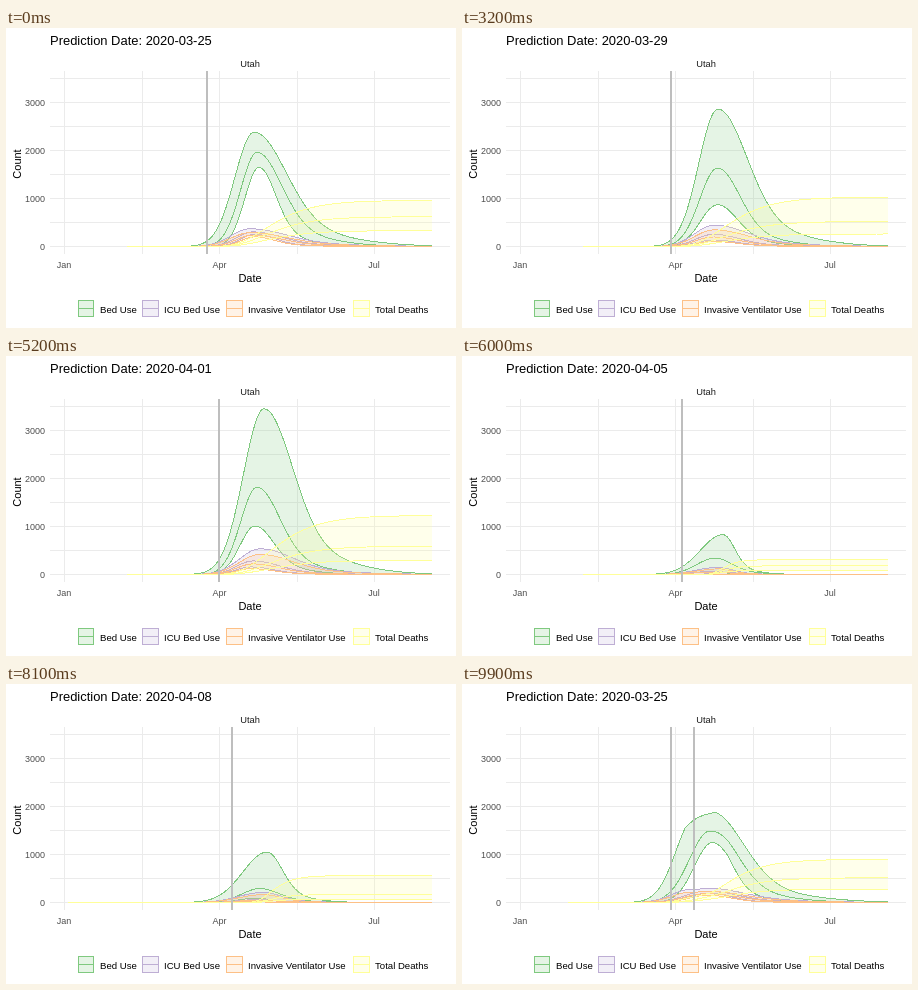
These frames come from a looping animation (450 by 300 pixels, 10000 ms). An HTML page:

```html
<!DOCTYPE html>
<html lang="en">
<head>
<meta charset="utf-8">
<title>Prediction by date</title>
<style>
  html, body { margin: 0; width: 100%; height: 100%; overflow: hidden; background: #fff; }
  svg { display: block; font-family: "Liberation Sans", Arial, sans-serif; }
  path, rect { shape-rendering: crispEdges; }
  .tick { font-size: 9px; fill: #4d4d4d; }
  .axis { font-size: 11px; }
  .mid { text-anchor: middle; }
  .end { text-anchor: end; }
</style>
</head>
<body>
<svg id="stage" width="450" height="300" viewBox="0 0 450 300"></svg>
<script>
const stage = document.getElementById('stage');
const START_X = 121, END_X = 426, ZERO_Y = 218.5, SAMPLES = 500;
const FRAME_MS = 100, FRAMES = 100, TWEEN_FRAMES = 4;

const dayX = day => 58 + day * 155 / 91;
const valueY = v => ZERO_Y - v * 0.048;
const mix = (a, b, f) => a + (b - a) * f;
const clamp = v => Math.max(0, Math.min(1, v));

function add(tag, attrs, text) {
  const el = document.createElementNS('http://www.w3.org/2000/svg', tag);
  for (const name in attrs) el.setAttribute(name, attrs[name]);
  if (text !== undefined) el.textContent = text;
  return stage.appendChild(el);
}

// Bed curves are [peak x, height, left spread, right spread] for upper, mean, lower.
const early = {
  start: 121, icu: 0.155, rise: [258, 27], deaths: [960, 620, 330],
  beds: [[248, 2380, 27, 44], [251, 1960, 23, 34], [253, 1650, 20, 23]]
};
const wider = {
  start: 121, icu: 0.155, rise: [260, 27], deaths: [962, 500, 250],
  beds: [[255, 2670, 26, 40], [257, 1590, 25, 30], [258, 850, 24, 27]]
};
const highest = {
  start: 121, icu: 0.155, rise: [262, 28], deaths: [1230, 590, 295],
  beds: [[258, 3450, 29, 39], [251, 1820, 23, 31], [249, 1010, 21, 26]]
};
const lowest = {
  start: 121, icu: 0.18, rise: [259, 10], deaths: [310, 180, 90],
  beds: [[261, 830, 32, 16], [253, 340, 26, 23], [250, 60, 24, 17]]
};
const later = {
  start: 62, icu: 0.2, rise: [264, 13], deaths: [560, 165, 70],
  beds: [[261, 1050, 34, 21], [254, 290, 26, 26], [250, 90, 24, 19]]
};
const latest = {
  start: 62, icu: 0.2, rise: [264, 18], deaths: [720, 200, 130],
  beds: [[262, 480, 34, 43], [258, 130, 28, 35], [255, 50, 26, 26]]
};

// [date, day of year from 0, first frame of the change to the next state, forecast]
const states = [
  ['03-25', 84, 5, early], ['03-26', 85, 14, early], ['03-27', 86, 23, early],
  ['03-29', 88, 32, wider], ['03-30', 89, 41, highest], ['03-31', 90, 49, highest],
  ['04-01', 91, 57, highest], ['04-05', 95, 65, lowest], ['04-07', 97, 73, lowest],
  ['04-08', 98, 81, later], ['04-09', 99, 89, later], ['04-12', 102, 97, latest]
].map(([date, day, leave, forecast]) => ({ date, x: dayX(day), leave, forecast }));

const bell = d => Math.exp(-d * d);

// Steep rise, and a fall with a long tail.
function hump(x, [peak, height, left, right]) {
  const d = x - peak;
  return height * (d < 0 ? bell(d / left) : 0.8 * bell(d / right) + 0.2 * bell(d / right / 2.2));
}

const care = scale => (m, band, x) => {
  const [peak, height, left, right] = m.beds[band];
  return hump(x, [peak - 4, height * m.icu * scale, left, right * 1.15]);
};

const series = [
  { name: 'Bed Use', color: '#7fc97f', keyX: 72, keyW: 15, value: (m, band, x) => hump(x, m.beds[band]) },
  { name: 'ICU Bed Use', color: '#beaed4', keyX: 136, keyW: 16, value: care(1) },
  { name: 'Invasive Ventilator Use', color: '#fdc086', keyX: 220, keyW: 16, value: care(0.78) },
  { name: 'Total Deaths', color: '#ffff99', keyX: 347, keyW: 16,
    value: (m, band, x) => m.deaths[band] * Math.exp(-Math.exp((m.rise[0] - x) / m.rise[1])) }
];

// Curves with an earlier start pair up with the others by a lag that fades out across these spans.
const lagSpans = [[238, 254], [205, 265], [205, 265]];

function pairedX(x, band, m) {
  const [lo, hi] = lagSpans[band];
  return x - (START_X - m.start) * clamp((hi - x) / (hi - lo));
}

function curve(value, band, a, b, f) {
  const points = [];
  for (let i = 0; i <= SAMPLES; i++) {
    const x = mix(START_X, END_X, i / SAMPLES);
    const xa = pairedX(x, band, a), xb = pairedX(x, band, b);
    const v = mix(value(a, band, xa), value(b, band, xb), f);
    points.push(mix(xa, xb, f).toFixed(2) + ' ' + valueY(v).toFixed(2));
  }
  return points;
}

// Static grid and text
const grid = { fill: '#ebebeb' };
for (const x of [58, 136, 213, 291, 368]) add('rect', { x, y: 43, width: 1, height: 183, ...grid });
for (let v = 0; v <= 3500; v += 500) {
  add('rect', { x: 44, y: valueY(v) - 0.5, width: 400, height: 1, ...grid });
  if (v % 1000 === 0) add('text', { x: 39, y: valueY(v) + 3.5, class: 'tick end' }, v);
}
[['Jan', 58], ['Apr', 213.5], ['Jul', 368]].forEach(([month, x]) =>
  add('text', { x, y: 240, class: 'tick mid' }, month));
add('text', { x: 244, y: 39, class: 'mid', 'font-size': 9.3, fill: '#1a1a1a' }, 'Utah');
add('text', { x: 244, y: 254, class: 'axis mid' }, 'Date');
add('text', { transform: 'translate(15 136) rotate(-90)', class: 'axis mid' }, 'Count');
const title = add('text', { x: 44, y: 17, 'font-size': 12.95 });

for (const s of series) {
  const { color, keyX, keyW } = s;
  add('rect', { x: keyX + 0.5, y: 272.5, width: keyW, height: 16, fill: color, 'fill-opacity': 0.2, stroke: color });
  add('path', { d: `M${keyX} 280.5h${keyW + 1}`, stroke: color });
  add('text', { x: keyX + 22, y: 285, 'font-size': 9.6 }, s.name);
  s.fill = add('path', { fill: color, 'fill-opacity': 0.2 });
  s.lines = add('path', { fill: 'none', stroke: color });
}

const marker = () => add('rect', { y: 43, width: 2, height: 183, fill: '#bebebe' });
const dateLine = marker(), leavingLine = marker();
const place = (line, x) => line.setAttribute('x', Math.floor(x - 0.25));

function draw(frame) {
  let i = states.findLastIndex(s => s.leave <= frame);
  if (i < 0) { i = states.length - 1; frame += FRAMES; }
  const from = states[i], to = states[(i + 1) % states.length];
  const f = Math.min(1, (frame - from.leave + 1) / TWEEN_FRAMES);

  title.textContent = 'Prediction Date: 2020-' + (f > 0.5 ? to : from).date;
  for (const s of series) {
    const [upper, mean, lower] = [0, 1, 2].map(band =>
      curve(s.value, band, from.forecast, to.forecast, f));
    s.fill.setAttribute('d', 'M' + upper.concat([...lower].reverse()).join('L') + 'Z');
    s.lines.setAttribute('d', [upper, lower, mean].map(p => 'M' + p.join('L')).join(''));
  }
  place(dateLine, mix(from.x, to.x, f));
  // On the way back to the first date, a second line stays behind.
  const staying = to === states[0] && f < 1;
  leavingLine.setAttribute('visibility', staying ? 'visible' : 'hidden');
  place(leavingLine, from.x);
}

let shown = -1;
function tick() {
  const frame = Math.floor(performance.now() / FRAME_MS) % FRAMES;
  if (frame !== shown) draw(shown = frame);
  requestAnimationFrame(tick);
}
tick();
</script>
</body>
</html>
```
